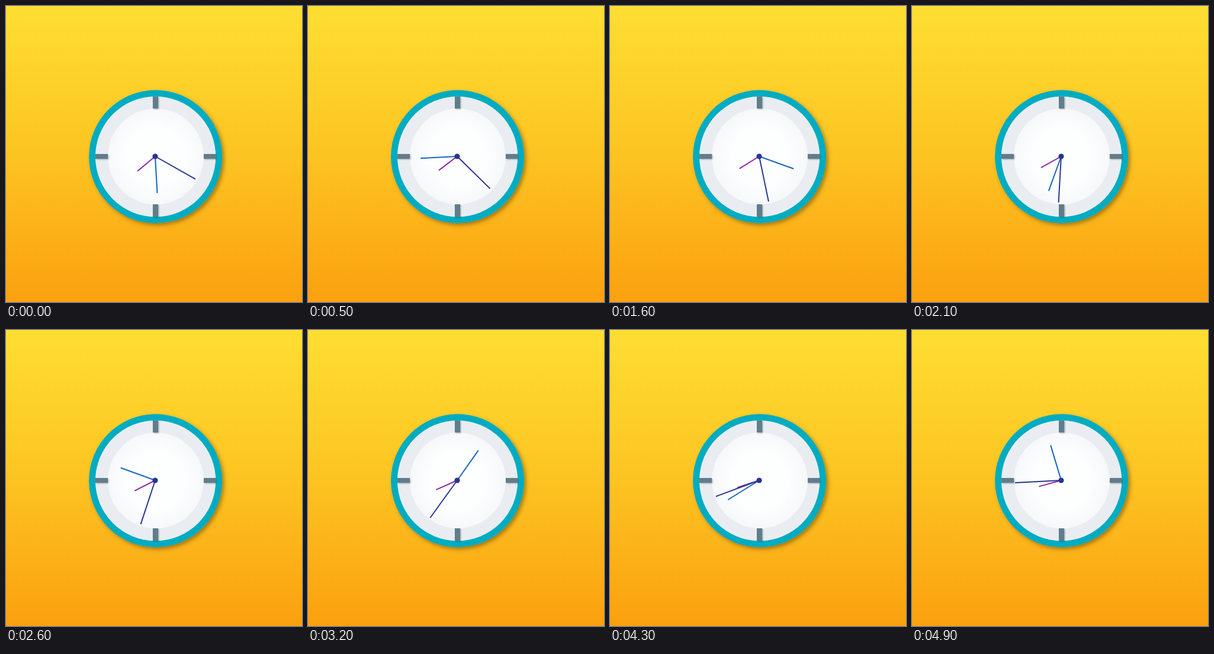
Animation of 500 by 500 pixels, one loop 5 s. Source, as an HTML page:

```html
<!DOCTYPE html>
<html lang="en">
<head>
<meta charset="utf-8">
<title>Clock</title>
<style>
  html, body { margin: 0; width: 100%; height: 100%; overflow: hidden; }
  body { background: linear-gradient(#fede32, #fcc422 50%, #fba00f); }
  svg { display: block; width: 100vw; height: 100vh; }
</style>
</head>
<body>
<svg viewBox="0 0 500 500">
  <defs>
    <filter id="soft" x="-20%" y="-20%" width="140%" height="140%">
      <feDropShadow dx="3.5" dy="3.5" stdDeviation="3" flood-color="#5a3c00" flood-opacity=".5"/>
    </filter>
    <filter id="small" filterUnits="userSpaceOnUse" x="130" y="130" width="250" height="250">
      <feDropShadow dx="1.2" dy="1.2" stdDeviation="1" flood-color="#000" flood-opacity=".35"/>
    </filter>
    <radialGradient id="glow">
      <stop offset=".6" stop-color="#fdfefe"/>
      <stop offset="1" stop-color="#f6f8fa"/>
    </radialGradient>
  </defs>
  <circle cx="252.6" cy="254.5" r="112.5" fill="#00acc1" filter="url(#soft)"/>
  <circle cx="252.6" cy="254.5" r="101.7" fill="#e9edf1"/>
  <circle cx="253" cy="254.2" r="81" fill="url(#glow)"/>
  <g fill="#607d8b" filter="url(#small)">
    <path d="M248 153h9v20h-9zM248 335h9v21h-9zM151 250h21v8h-21zM334 250h20v8h-20z"/>
  </g>
  <g stroke-width="2">
    <path id="hour" d="M0 0V-39" stroke="#8e24aa"/>
    <path id="second" d="M0 0V-62" stroke="#1565c0"/>
    <path id="minute" d="M0 0V-78" stroke="#283593"/>
  </g>
  <circle cx="252" cy="254" r="4.6" fill="#283593"/>
</svg>
<script>
  const LOOP = 5000, STEP = 100;

  // start angle in degrees, speed in degrees per second
  const hands = [
    ["hour", 230.2, 4.95],
    ["second", 176.8, 180.3],
    ["minute", 119.4, 30.05]
  ].map(([id, start, speed]) => ({ el: document.getElementById(id), start, speed }));

  function draw(ms) {
    // ten pictures a second, taken from motion at 24 per second
    const step = Math.floor(ms % LOOP / STEP);
    const sec = Math.ceil(step * 12 / 5) / 24;
    for (const { el, start, speed } of hands)
      el.setAttribute("transform", `translate(252 254) rotate(${start + speed * sec})`);
  }

  const t0 = performance.now();
  function tick() {
    draw(performance.now() - t0);
    requestAnimationFrame(tick);
  }
  tick();
</script>
</body>
</html>
```
